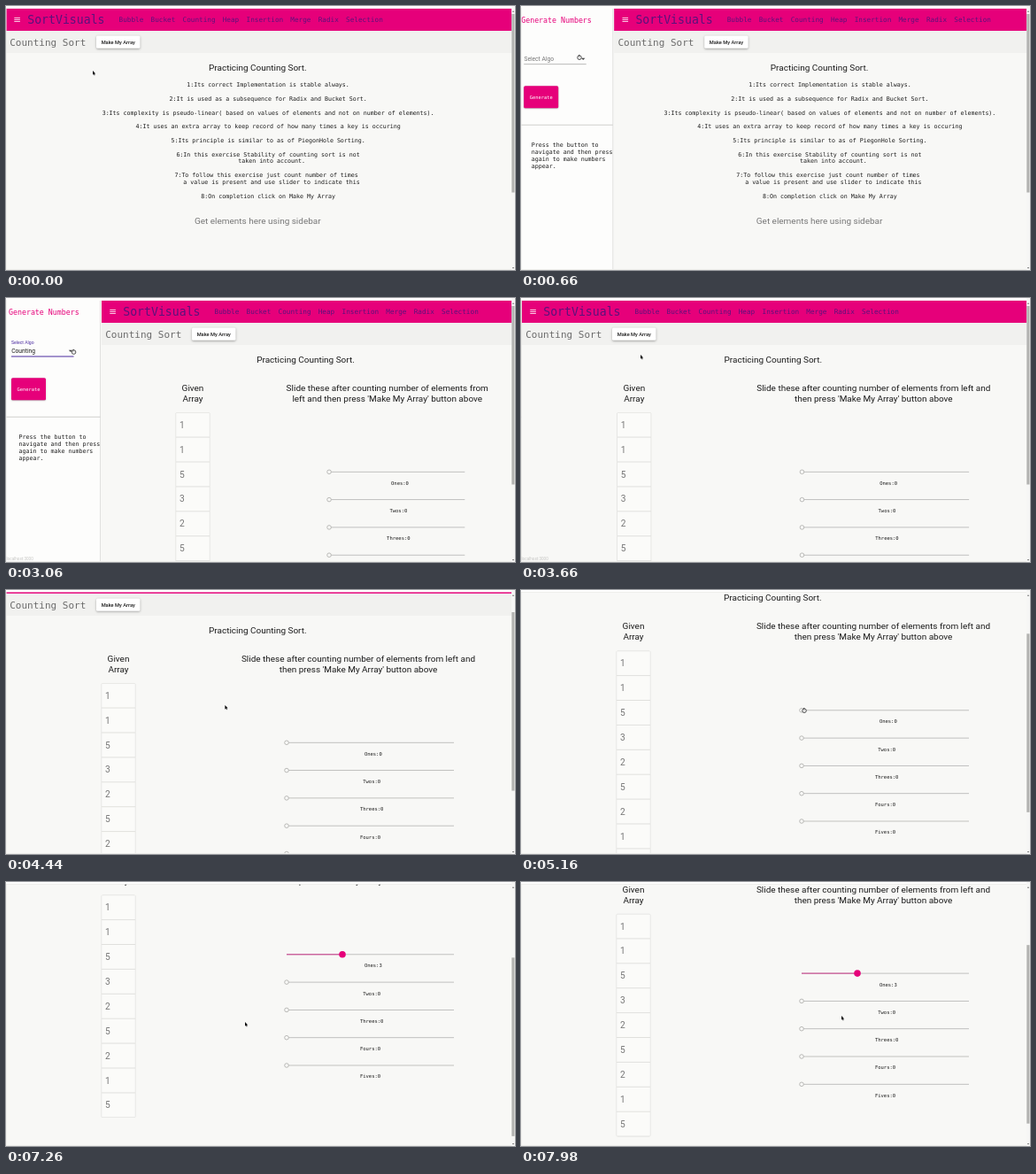
An HTML page with a canvas for the animation above (8 s loop, 575 by 298 pixels).

```html
<!DOCTYPE html>
<html lang="en">
<head>
<meta charset="utf-8">
<title>Counting Sort practice</title>
<style>
html, body { margin: 0; width: 100%; height: 100%; overflow: hidden; background: #fff; }
canvas { display: block; width: 575px; height: 298px; }
</style>
</head>
<body>
<canvas id="stage"></canvas>
<script>
const W = 575, H = 298, LOOP = 8000, PAGE_W = 571;
const PINK = '#e6007a', INK = '#1c1c1c', GREY = '#777', PURPLE = '#5a127c', FOCUS = '#4a2aa0', PAGE = '#f8f8f6';
const MONO = '"DejaVu Sans Mono", monospace', SANS = 'Roboto, sans-serif';
const BODY = 6.64, HEAD = 9.97, LABEL = 6.7;
const PICK = 1830, GENERATE = 2720, RELEASE = 6500;
const canvas = document.getElementById('stage');
const ctx = canvas.getContext('2d');
const dpr = window.devicePixelRatio || 1;
canvas.width = W * dpr;
canvas.height = H * dpr;

const clamp = v => Math.max(0, Math.min(1, v));
const ramp = (t, from, to) => clamp((t - from) / (to - from));
const easeOut = p => 1 - (1 - p) ** 3;
const easeBoth = p => p * p * (3 - 2 * p);
const mix = (a, b, p) => a + (b - a) * p;

// Each move eases from wherever the one before it ended
const pointerMoves = [
  { from: 0, to: 0, x: 98, y: 73 },
  { from: 60, to: 390, x: 12, y: 15, hand: true },
  { from: 450, to: 660, x: 66, y: 55, hand: true },
  { from: 1120, to: 1620, x: 56, y: 88, hand: true },
  { from: PICK, to: 1980, x: 71, y: 114 },
  { from: 1980, to: 2220, x: 27, y: 108, hand: true },
  { from: 2800, to: 3300, x: 120, y: 14, hand: true },
  { from: 3450, to: 3660, x: 135, y: 64 },
  { from: 3660, to: 4080, x: 236, y: 128 },
  { from: 4260, to: 5040, x: 319, y: 142 },
  { from: 5090, to: 5150, x: 320, y: 133, hand: true },
  { from: 5820, to: RELEASE, x: 380, y: 134, hand: true },
  { from: 6660, to: 7200, x: 270, y: 158 },
  { from: 7660, to: 7740, x: 335, y: 147 },
  { from: 7900, to: 7980, x: 362, y: 151 }
];
const scrollMoves = [
  { from: 0, to: 0, y: 0 },
  { from: 4260, to: 4680, y: 60.5 },
  { from: 6660, to: 7140, y: 114.5 },
  { from: 7270, to: 7440, y: 93.2 }
];

const sorts = ['Bubble', 'Bucket', 'Counting', 'Heap', 'Insertion', 'Merge', 'Radix', 'Selection'];
const notes = [
  ['1:Its correct Implementation is stable always.'],
  ['2:It is used as a subsequence for Radix and Bucket Sort.'],
  ['3:Its complexity is pseudo-linear( based on values of elements and not on number of elements).'],
  ['4:It uses an extra array to keep record of how many times a key is occuring'],
  ['5:Its principle is similar to as of PiegonHole Sorting.'],
  ['6:In this exercise Stability of counting sort is not', '  taken into account.'],
  ['7:To follow this exercise just count number of times ', '  a value is present and use slider to indicate this'],
  ['8:On completion click on Make My Array']
];
const help = ['Press the button to', 'navigate and then press', 'again to make numbers', 'appear.'];
const values = [...'115325215'];
const sliders = ['  Ones', ' Twos', ' Threes', 'Fours', 'Fives'];

function follow(moves, t) {
  const i = moves.findLastIndex(m => t >= m.from);
  const next = moves[i], prev = moves[i - 1] || next;
  const p = next.to > next.from ? ramp(t, next.from, next.to) : 1;
  const e = easeBoth(p);
  return {
    x: mix(prev.x, next.x, e),
    y: mix(prev.y, next.y, e),
    hand: next.hand && (prev.hand || p > 0.8)
  };
}

// y is the middle of the capitals
function text(s, x, y, size, color, family = MONO, align = 'left', weight = 400) {
  ctx.font = `${weight} ${size}px ${family}`;
  ctx.textAlign = align;
  ctx.fillStyle = color;
  ctx.fillText(s, x, y + size * 0.36);
}
const heading = (s, x, y, color = INK) => text(s, x, y, HEAD, color, SANS, 'center');
function rect(x, y, w, h, color) {
  ctx.fillStyle = color;
  ctx.fillRect(x, y, w, h);
}
function card(x, y, w, h, color, shadow = 0) {
  ctx.save();
  ctx.shadowColor = 'rgba(0,0,0,.35)';
  ctx.shadowBlur = shadow * dpr;
  ctx.shadowOffsetY = shadow / 3 * dpr;
  if (!shadow) ctx.shadowColor = 'transparent';
  ctx.fillStyle = color;
  ctx.beginPath();
  ctx.roundRect(x, y, w, h, 1.6);
  ctx.fill();
  ctx.restore();
}
function disc(x, y, r, fill, stroke, width = 0.8) {
  ctx.beginPath();
  ctx.arc(x, y, r, 0, 7);
  ctx.fillStyle = fill;
  ctx.fill();
  if (!stroke) return;
  ctx.strokeStyle = stroke;
  ctx.lineWidth = width;
  ctx.stroke();
}
function triangle(x, y, w, h, color) {
  ctx.beginPath();
  ctx.moveTo(x - w / 2, y);
  ctx.lineTo(x + w / 2, y);
  ctx.lineTo(x, y + h);
  ctx.fillStyle = color;
  ctx.fill();
}

function drawHeader(x) {
  rect(x, 3, PAGE_W - x, 25, PINK);
  for (let i = 0; i < 3; i++) rect(x + 9.3, 13 + i * 2, 6.6, 0.8, '#fff');
  text('SortVisuals', x + 24.2, 15.5, 13.2, PURPLE);
  let left = x + 127.5;
  for (const s of sorts) {
    text(s, left, 15.5, 7.7, PURPLE);
    left += s.length * 4.6 + 8.4;
  }
  rect(x, 28, PAGE_W - x, 25, '#f1f1ef');
  text('Counting Sort', x + 4.2, 41, 11, '#6b6b6b');
  card(x + 102, 33.5, 49.5, 14.3, '#fff', 2.5);
  text('Make My Array', x + 126.7, 40.7, 5.7, INK, SANS, 'center', 500);
}

function drawNotes(mid) {
  const line = 7.82;
  let y = 89;
  for (const note of notes) {
    for (const s of note) {
      text(s, mid + 11.8, y, BODY, INK, MONO, 'center');
      y += line;
    }
    y += line;
  }
  heading('Get elements here using sidebar', mid, 242, GREY);
}

function drawSlider(x, y, w, name, value) {
  const end = x + w * value / 9;
  rect(x, y - 0.45, w, 0.9, '#bbbbb9');
  rect(x, y - 0.5, end - x, 1, '#cc3a8c');
  if (value > 0) disc(end, y, 3.8, PINK);
  else disc(x, y, 2.3, PAGE, '#ababa9');
  text(`${name}:${Math.round(value)}`, x + w / 2, y + 12.5, 5.5, INK, MONO, 'center');
}

function drawPractice(x, t) {
  const k = (PAGE_W - x) / PAGE_W;
  const left = x + 127 * k, right = x + 398 * k;
  const lines = k > 0.95
    ? ['Slide these after counting number of elements from left and', "then press 'Make My Array' button above"]
    : ['Slide these after counting number of elements from', "left and then press 'Make My Array' button above"];
  ['Given', 'Array'].forEach((s, i) => heading(s, left, 101.2 + i * 12, INK));
  lines.forEach((s, i) => heading(s, right, 101.2 + i * 12, INK));

  const cell = 27.9;
  card(left - 19.5, 129, 39, values.length * cell + 0.5, '#e0e0dd');
  values.forEach((v, i) => {
    const y = 129 + i * cell;
    rect(left - 18.8, y + 0.7, 37.6, cell - 1, '#fbfbf9');
    text(v, left - 15, y + 14.1, 10.2, GREY, SANS);
  });

  // The thumb hops to the nearest whole step
  const drag = Math.max(0, (follow(pointerMoves, Math.min(t, RELEASE)).x - 317) / 21);
  const step = Math.floor(drag);
  const value = step + easeBoth(clamp((drag - step - 0.4) * 5));
  sliders.forEach((name, i) =>
    drawSlider(x + 317 * k, 196.3 + i * 31.3, 189 * k, name, i ? 0 : value));
}

function drawMenu(t) {
  const alpha = ramp(t, 1090, 1300) * (1 - ramp(t, PICK, 1960));
  if (alpha <= 0) return;
  const grow = easeOut(ramp(t, 1090, 1330)), row = 15.2;
  ctx.save();
  ctx.globalAlpha = alpha;
  ctx.translate(41, 59);
  ctx.scale(mix(0.75, 1, grow), mix(0.56, 1, grow));
  ctx.translate(-41, -59);
  card(3, 49, 77, 97.5, '#fff', 4);
  const hover = Math.floor((follow(pointerMoves, t).y - 52) / row);
  sorts.slice(0, 6).forEach((s, i) => {
    if (i === hover) rect(3, 52.2 + i * row, 77, row, '#ececec');
    text(s, 9.5, 59.8 + i * row, LABEL, INK, SANS);
  });
  ctx.restore();
}

function drawDrawer(open, t) {
  if (open <= 0.004) return;
  const picked = t >= PICK;
  ctx.save();
  ctx.translate(107 * (open - 1), 0);
  rect(0, 0, 107, H, '#fdfdfc');
  rect(106.3, 3, 0.7, H, '#d5d5d3');
  text('Generate Numbers', 3, 15.7, 8.28, PINK);
  if (picked) text('Select Algo', 6, 50.2, 5.1, FOCUS, SANS);
  text(picked ? 'Counting' : 'Select Algo', 6.2, 59.8, LABEL, picked ? INK : GREY, SANS);
  triangle(73, 58.8, 4.4, 2.3, '#444');
  rect(6, 65.5, 70.5, picked ? 1 : 0.6, picked ? FOCUS : '#8d8d8d');
  card(6, 90.3, 39, 25, PINK, 1.5);
  text('Generate', 25.5, 102.7, 5.4, '#fff', MONO, 'center');
  rect(0, 133.8, 106.5, 0.8, '#c4c4c2');
  help.forEach((s, i) => text(s, 14.6, 156.7 + i * 7.85, BODY, INK));
  drawMenu(t);
  ctx.restore();
}

function drawScrollbar(scroll) {
  rect(PAGE_W, 0, 4, H, '#f6f6f5');
  rect(571.3, 9 + scroll * 0.667, 3.2, 201.5, '#b3b3b1');
  triangle(573, 6.8, 2.4, -1.5, '#666');
  triangle(573, 295, 2.4, 1.5, '#666');
}

function drawPointer(t) {
  const { x, y, hand } = follow(pointerMoves, t);
  ctx.save();
  ctx.translate(x, y);
  if (hand) {
    rect(-1, 0, 1.3, 3, '#444');
    disc(0, 3.2, 2.3, 'rgba(235,235,235,.8)', '#444', 0.9);
  } else {
    const arrow = new Path2D('M0 0V4.8L1.1 3.8 1.8 5.4 2.6 5 1.9 3.5 3.3 3.4Z');
    ctx.strokeStyle = '#fff';
    ctx.lineWidth = 0.8;
    ctx.stroke(arrow);
    ctx.fillStyle = '#111';
    ctx.fill(arrow);
  }
  ctx.restore();
}

function draw(t) {
  const open = easeOut(ramp(t, 450, 750)) - easeOut(ramp(t, 3440, 3720));
  const scroll = follow(scrollMoves, t).y;
  const x = 108 * open, mid = 284.3 + 54.2 * open;
  ctx.setTransform(dpr, 0, 0, dpr, 0, 0);
  rect(0, 0, W, H, '#fff');
  rect(0, 2.3, PAGE_W, H, PAGE);

  ctx.save();
  ctx.beginPath();
  ctx.rect(0, 2.5, PAGE_W, H);
  ctx.clip();
  ctx.translate(0, -scroll);
  drawHeader(x);
  heading('Practicing Counting Sort.', mid, 69.3);
  if (t < GENERATE) drawNotes(mid);
  else drawPractice(x, t);
  ctx.restore();

  drawDrawer(open, t);
  if (scroll > 28) rect(0, 2, PAGE_W, 0.6, '#e6e6e3');
  rect(0, 2, 0.6, H, '#ebebe8');
  rect(0, 297, PAGE_W, 1, '#ededea');
  ctx.globalAlpha = ramp(t, GENERATE, 2780) * (1 - ramp(t, 3840, 4080));
  text('localhost:3000', 0.5, 294.5, 4.6, '#c6c6c4', SANS);
  ctx.globalAlpha = 1;
  drawScrollbar(scroll);
  drawPointer(t);
}

const start = performance.now();
function frame() {
  draw(Math.max(0, performance.now() - start) % LOOP);
  requestAnimationFrame(frame);
}
frame();
</script>
</body>
</html>
```
